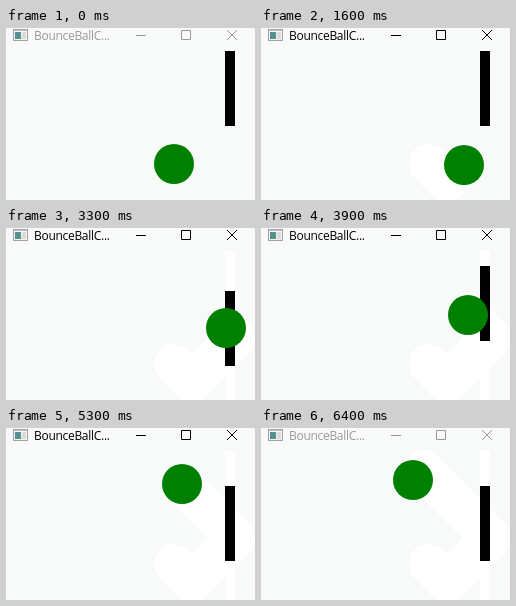
An HTML page that plays this animation: 249x172 px, repeating every 6500 ms.

```html
<!DOCTYPE html>
<html lang="en">
<head>
<meta charset="utf-8">
<title>Bounce ball</title>
<style>
  html, body { margin: 0; width: 100%; height: 100%; overflow: hidden; background: #f8faf9; }
  svg { display: block; width: 100%; height: 100%; }
  text { font: 12px "Open Sans", "Noto Sans", sans-serif; letter-spacing: -.3px; }
</style>
</head>
<body>
<svg viewBox="0 0 249 172">
  <defs>
    <linearGradient id="pane" x2=".6" y2="1">
      <stop stop-color="#5b86a8"/>
      <stop offset="1" stop-color="#4f9a78"/>
    </linearGradient>
  </defs>
  <rect width="249" height="172" fill="#f8faf9"/>
  <g>
    <rect x="7.5" y="1.5" width="14" height="11" fill="#f4f4f4" stroke="#a3a3a3"/>
    <path d="M8 2.5H21" stroke="#c4c4c4"/>
    <rect x="9" y="4" width="6" height="7" fill="url(#pane)"/>
    <rect x="16" y="4" width="4" height="7" fill="#dcdcdc"/>
  </g>
  <text id="title" x="28" y="12">BounceBallC...</text>
  <path id="buttons" d="M130 7.5H140M175.5 2.5h9v9h-9zM221 2l10 10M231 2l-10 10" fill="none"/>
  <path id="trail" fill="none" stroke="#fff" stroke-width="40" stroke-linecap="round" stroke-linejoin="round"/>
  <rect id="track" x="219" y="23" width="10" fill="#fff"/>
  <rect id="paddle" x="219" width="10" height="75"/>
  <circle id="ball" r="20" fill="#008000"/>
</svg>
<script>
const LOOP = 6500, STEP = 100, TOP = 23, PADDLE = 75;
const $ = id => document.getElementById(id);
const [title, buttons, trail, track, paddle, ball] =
  ['title', 'buttons', 'trail', 'track', 'paddle', 'ball'].map($);

// Paddle key presses: [time, top edge]
const moves = [
  [0, 23], [1700, 38], [2200, 58], [2300, 78], [2400, 98], [2600, 83],
  [3300, 63], [3400, 43], [3500, 23], [3600, 38], [4100, 58], [4200, 83],
  [4300, 98], [4400, 83], [4800, 58], [4900, 38], [5100, 58]
];

// Distances at which the ball turns: floor, right wall, ceiling
const turns = [18, 62, 130];

const travelled = t => Math.max(0, Math.round(t * 0.0219 - 0.05));
const position = n => [
  230 - Math.abs(62 - n),
  42 + Math.abs(112 - Math.abs(n - 18))
];

function set(el, attrs) {
  for (const key in attrs) el.setAttribute(key, attrs[key]);
}

function render(time) {
  const t = Math.floor((time % LOOP) / STEP) * STEP;
  const [cx, cy] = position(travelled(t));
  set(ball, { cx, cy });

  const last = travelled(t - STEP);
  const path = [0, ...turns.filter(n => n < last), last].map(position);
  set(trail, { d: t ? 'M' + path.join('L') : '' });

  const done = moves.filter(([at]) => at <= t).map(([, y]) => y);
  set(paddle, { y: done[done.length - 1] });
  set(track, { height: Math.max(...done) + PADDLE - TOP });

  // The window has focus only while the keys are in use
  const active = t >= 900 && t < 6400;
  set(buttons, { stroke: active ? '#000' : '#999' });
  set(title, { fill: active ? '#000' : '#999' });
}

const start = performance.now();
function tick() {
  render(performance.now() - start);
  requestAnimationFrame(tick);
}
tick();
</script>
</body>
</html>
```
